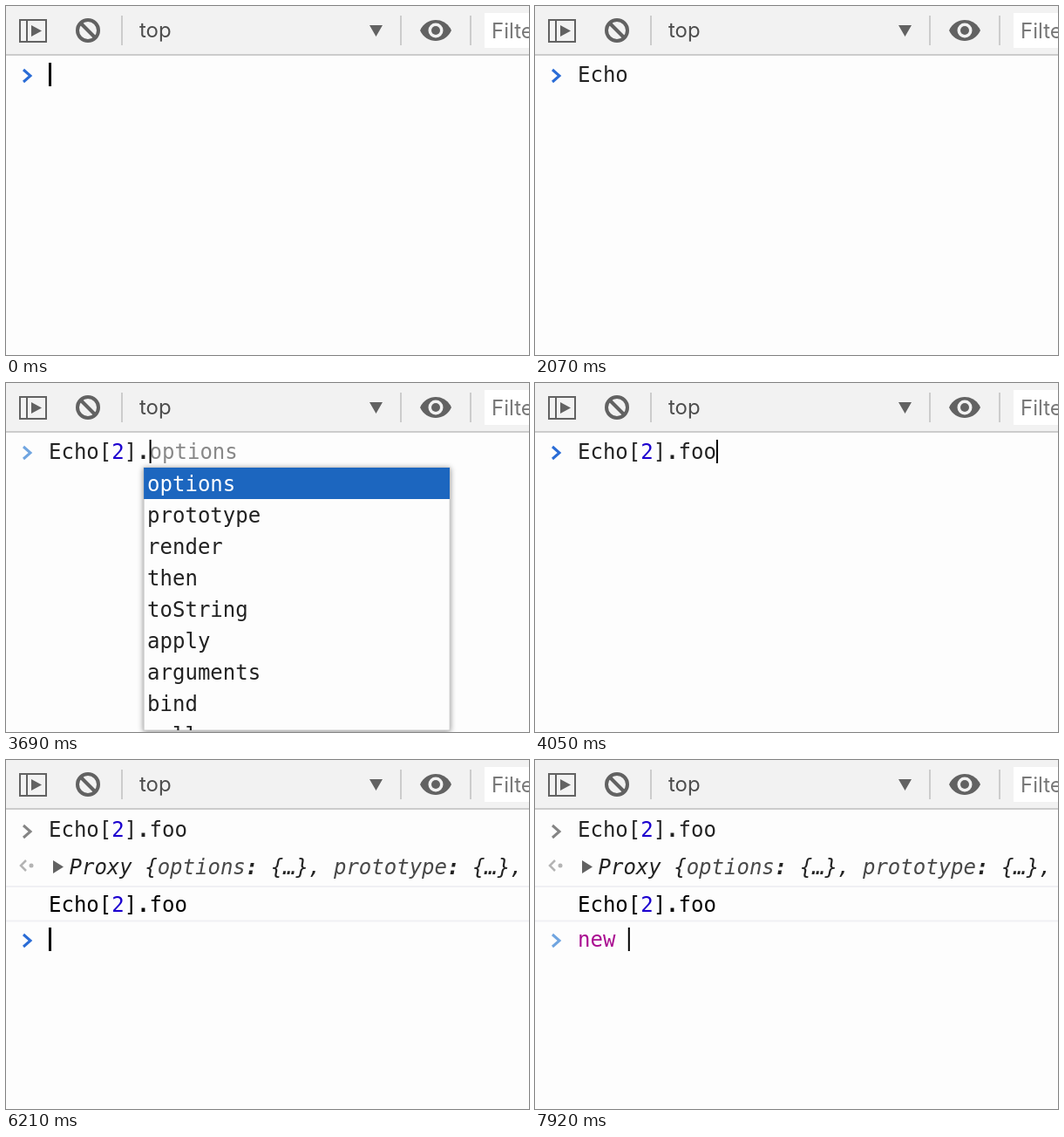
These frames come from a looping animation (600x400 px, 8000 ms). An HTML page:

```html
<!DOCTYPE html>
<html lang="en">
<head>
<meta charset="utf-8">
<title>Console</title>
<style>
  html, body { margin: 0; width: 100%; height: 100%; overflow: hidden; background: #fdfdfd; }
  svg { display: block; }
  text { white-space: pre; font: 24px "DejaVu Sans Mono", monospace; fill: #222; }
  .ui { font: 24px Inter, sans-serif; fill: #4d4d4d; }
  .num { fill: #1c00cf; }
  .key { fill: #aa0d91; }
  .ghost { fill: #888; }
  .dim { fill: #484848; }
  .bold { font-weight: bold; }
  .panel { fill: #fdfdfd; stroke: #ccc; filter: drop-shadow(0 1px 3px #888); }
  .chevron { fill: none; stroke-width: 3; }
</style>
</head>
<body>
<svg width="600" height="400" viewBox="0 0 600 400">
  <rect width="600" height="400" fill="#fdfdfd"/>
  <rect width="600" height="56" fill="#f2f2f2"/>
  <rect y="55" width="600" height="2" fill="#ccc"/>
  <g fill="none" stroke="#626262" stroke-width="2">
    <path d="M16 16H46V41H16ZM24 16V41"/>
    <g stroke-width="4"><circle cx="94" cy="28" r="12"/><path d="M85.5 19.5L102.5 36.5"/></g>
  </g>
  <g fill="#626262">
    <path d="M29 22L41 28.5L29 35ZM417 22H432L424.500 35Z"/>
    <path d="M475 28C482 12 504 12 511 28C504 44 482 44 475 28Z"/>
    <circle cx="493" cy="28" r="8.500" fill="#f2f2f2"/>
    <circle cx="493" cy="28" r="5"/>
  </g>
  <path d="M133 11V45M453 11V45M533 11V45" stroke="#ccc" stroke-width="2"/>
  <rect x="549" y="8" width="51" height="40" fill="#fff"/>
  <text class="ui" x="153" y="36">top</text>
  <text class="ui" x="557" y="37" style="fill:#777">Filter</text>
  <g id="live"></g>
</svg>
<script>
const LOOP = 8000, BLINK = 530, CHAR = 14.45, LEFT = 49, ROW = 36;
const live = document.getElementById('live');

const words = s => s.split(' ');
const members = words('options prototype render then toString apply arguments bind call');
const lists = {
  E: words('Echo Element ElementInternals Error ErrorEvent EvalError Event EventSource EventTarget'),
  Ec: words('Echo DOMRect DOMRectList DOMRectReadOnly IntersectionObserver MediaRecorder MessageChannel Object Reflect'),
  Ech: words('Echo MessageChannel RTCDTMFToneChangeEvent SpeechSynthesisErrorEvent SpeechSynthesisEvent SpeechSynthesisUtterance oncuechange onlanguagechange onratechange'),
  'Echo[': members.map(m => `"${m}"]`),
  'Echo[2].': members,
  'Echo[2].f': words('isPrototypeOf valueOf __defineGetter__ __defineSetter__'),
  n: words('name navigator new null'),
  ne: words('netscape new')
};

// [time, typed text, suggestions open]
const steps = [
  [0, ''], [450, 'E'], [540, 'E', 1], [720, 'Ec', 1], [900, 'Ech', 1], [1530, 'Echo'],
  [2250, 'Echo['], [2340, 'Echo[', 1], [2520, 'Echo[2'], [2790, 'Echo[2]'],
  [3150, 'Echo[2].'], [3240, 'Echo[2].', 1], [3780, 'Echo[2].f', 1],
  [3960, 'Echo[2].fo'], [4050, 'Echo[2].foo'],
  [4770, ''], [7560, 'n'], [7605, 'n', 1], [7650, 'ne', 1], [7740, 'new'], [7830, 'new ']
];
const ENTER = 4770;

const text = (x, y, body, style = '') => `<text x="${x}" y="${y}" style="${style}">${body}</text>`;
const span = (cls, s) => `<tspan class="${cls}">${s}</tspan>`;
const chevron = (y, color) =>
  `<path class="chevron" d="M20 ${y - 7}L28 ${y}L20 ${y + 7}" stroke="${color}"/>`;
const tokenClass = s => s === '2' ? 'num' : s === '.' ? 'bold' : 'key';
const paint = s => s.replace(/[2.]|^new/g, m => span(tokenClass(m), m));

function history() {
  const line = paint('Echo[2].foo');
  const prop = name => span('dim', name) + span('bold', ':') + ' {…}, ';
  return chevron(82, '#858585') + text(LEFT, 88, line) +
    '<path class="chevron" d="M23 115L17 121L23 127" stroke="#b4b4b4" style="stroke-width:2.5"/>' +
    '<circle cx="29" cy="121" r="2.500" fill="#b4b4b4"/>' +
    '<path d="M54 115L66 122.500L54 130Z" fill="#626262"/>' +
    text(72.5, 131, 'Proxy {' + prop('options') + prop('prototype'), 'font-style:italic') +
    '<path d="M0 145H600M0 184.500H600" stroke="#f0f0f4" stroke-width="2"/>' +
    text(LEFT, 174, line, 'fill:#000');
}

function popup(items, query, x, y) {
  const w = /^E/.test(query) ? 460 : 351;
  const h = Math.min(items.length * ROW, 301);
  const rows = items.map((item, i) => {
    const at = item.toLowerCase().indexOf(query.toLowerCase()), end = at + query.length;
    const body = query && at >= 0
      ? item.slice(0, at) + span('bold', item.slice(at, end)) + item.slice(end)
      : item;
    return text(4, 27 + i * ROW, body, i ? '' : 'fill:#fff');
  });
  return `<rect class="panel" x="${x}" y="${y}" width="${w}" height="${h}"/>` +
    `<svg x="${x}" y="${y}" width="${w}" height="${h}">` +
    `<rect width="${w}" height="${ROW}" fill="#1c66bf"/>${rows.join('')}</svg>`;
}

function draw(t) {
  const [start, typed, open] = steps.findLast(s => s[0] <= t);
  const dy = t < ENTER ? 0 : 127;
  const end = LEFT + typed.length * CHAR;
  const query = typed.split(/[.[]/).pop();
  const items = open && lists[typed];
  const ghost = items && items[0].startsWith(query) ? items[0].slice(query.length) : '';
  const partial = /[[.2 ]$|new$/.test(typed);

  let out = dy ? history() : '';
  out += chevron(80 + dy, partial ? '#70a5e0' : '#2a6cd6');
  out += text(LEFT, 87 + dy, paint(typed) + span('ghost', ghost));
  if (Math.floor((t - start) / BLINK) % 2 === 0)
    out += `<rect x="${end}" y="${65 + dy}" width="${typed ? 2 : 3}" height="27"/>`;
  if (items) out += popup(items, query, end - query.length * CHAR - 6.5, 97 + dy);
  return out;
}

let last;
function tick() {
  const next = draw(performance.now() % LOOP);
  if (next !== last) live.innerHTML = last = next;
  requestAnimationFrame(tick);
}
tick();
</script>
</body>
</html>
```
